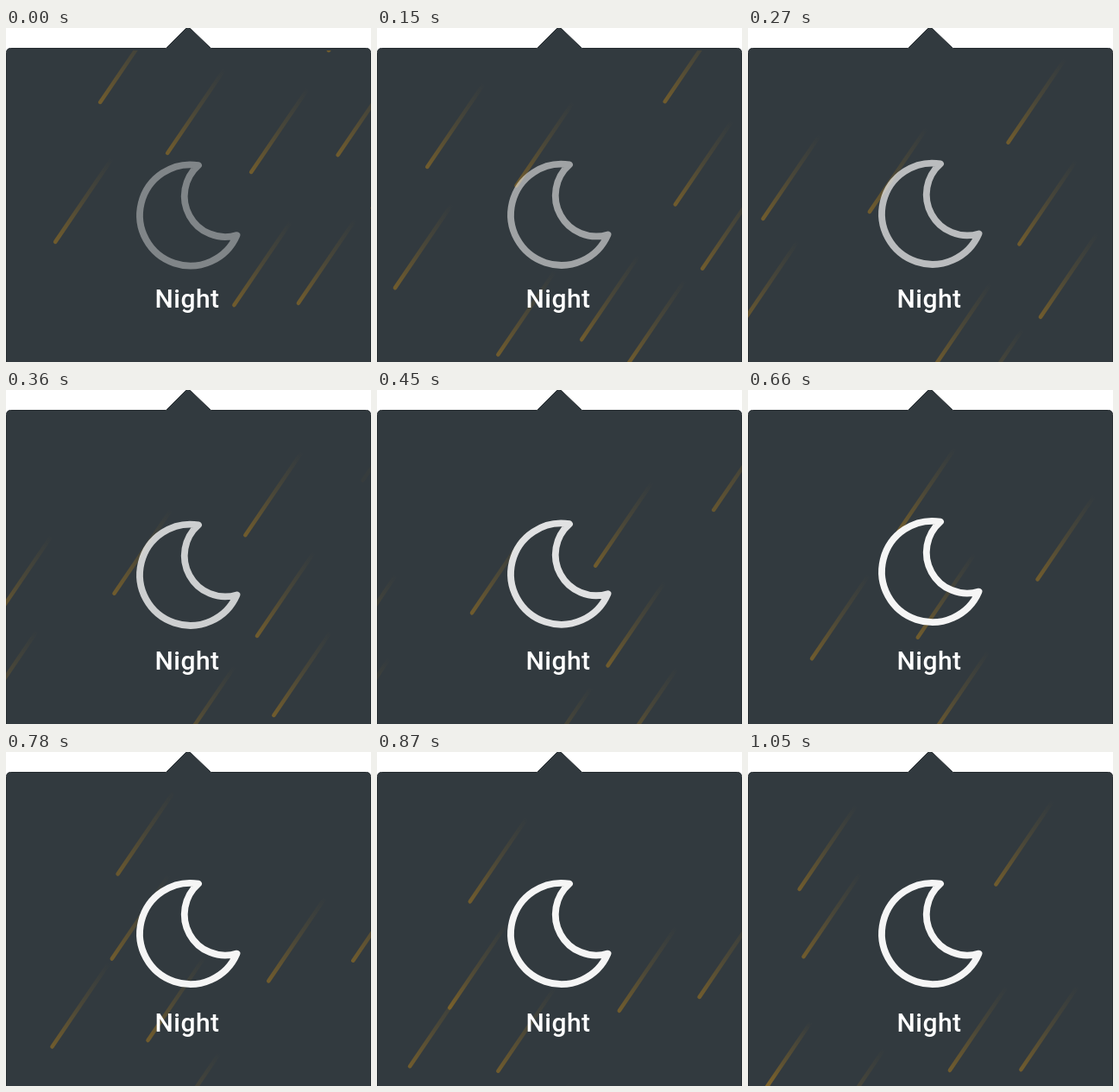
These frames come from a looping animation (423x387 px, 1080 ms). An HTML page:

```html
<!DOCTYPE html>
<html lang="en">
<head>
<meta charset="utf-8">
<title>Night</title>
<style>
  html, body { margin: 0; width: 100%; height: 100%; overflow: hidden; background: #fff; }
  svg { display: block; }
  text { font: 500 30px Roboto, "Open Sans", sans-serif; letter-spacing: .5px; fill: #fff; text-anchor: middle; }
</style>
</head>
<body>
<svg width="423" height="387" viewBox="0 0 423 387">
  <defs>
    <linearGradient id="trail" gradientUnits="userSpaceOnUse" x1="0" y1="0" x2="66" y2="-97">
      <stop stop-color="#e69b0a" stop-opacity=".34"/>
      <stop offset=".5" stop-color="#e69b0a" stop-opacity=".13"/>
      <stop offset="1" stop-color="#e69b0a" stop-opacity="0"/>
    </linearGradient>
    <clipPath id="sky"><path d="M0 26H423V387H0Z"/></clipPath>
  </defs>
  <path d="M.5 388V28.5Q.5 23.5 5.5 23.5H185.5L208.500 .5Q211 -2 213.500 .5L237.500 23.5H417.500Q422.500 23.5 422.500 28.500V388Z"
    fill="#323a3f" stroke="#262c30"/>
  <g id="rain" clip-path="url(#sky)" stroke="url(#trail)" stroke-width="4.5" stroke-linecap="round"></g>
  <path id="moon" d="M223 153A58.6 58.6 0 1 0 267.500 234A47.3 47.3 0 0 1 223 153Z"
    fill="none" stroke="#f5f5f5" stroke-width="7.8" stroke-linejoin="round"/>
  <text x="210" y="323.5">Night</text>
</svg>
<script>
const LOOP = 1080, STEP = 30, TOP = 26, SLANT = .68;

const rain = document.getElementById("rain");
const moon = document.getElementById("moon");
const clamp = v => Math.max(0, Math.min(1, v));
const streaks = [];

// A streak enters the sky at x and falls along the shared slant
function addStreak(x, launch, speed) {
  const line = document.createElementNS("http://www.w3.org/2000/svg", "path");
  line.setAttribute("d", "M0 0L66-97");
  rain.append(line);
  streaks.push({ line, x, launch, speed });
}

// A lane repeats its streak after a pause, at the same pace unless told otherwise
function addLane(x, launch, speed, gap, nextSpeed = speed) {
  addStreak(x, launch, speed);
  if (gap) addStreak(x, launch + gap, nextSpeed);
}

addLane(150, -120, .5, 980, .7);
addLane(208, -625, .355, LOOP);
addLane(268, -472, .252, 913, .63);
addLane(374, 0, .395, 862, .678);
addLane(467, -316, .383, 471);
addLane(549, -390, .468, 709);
addLane(380, -100, 1.41);
addLane(465, -1105, .267);
addLane(538, -623, .47);

function draw(t) {
  for (const { line, x, launch, speed } of streaks) {
    const fallen = (t - launch) * speed;
    line.setAttribute("transform", `translate(${x - fallen * SLANT} ${TOP + fallen})`);
    // Streaks that start during the loop emerge gradually
    line.setAttribute("opacity", launch > 0 ? clamp((fallen - 75) / 45) : 1);
  }
  const offset = 6.5 * (1 - clamp(t / 620) ** 1.6) - .4;
  moon.setAttribute("transform", `translate(0 ${offset})`);
  moon.setAttribute("opacity", clamp(.4 + t * .0011));
}

let start;
function tick(now) {
  start ??= now;
  draw(Math.floor((now - start) % LOOP / STEP) * STEP);
  requestAnimationFrame(tick);
}
draw(0);
requestAnimationFrame(tick);
</script>
</body>
</html>
```
